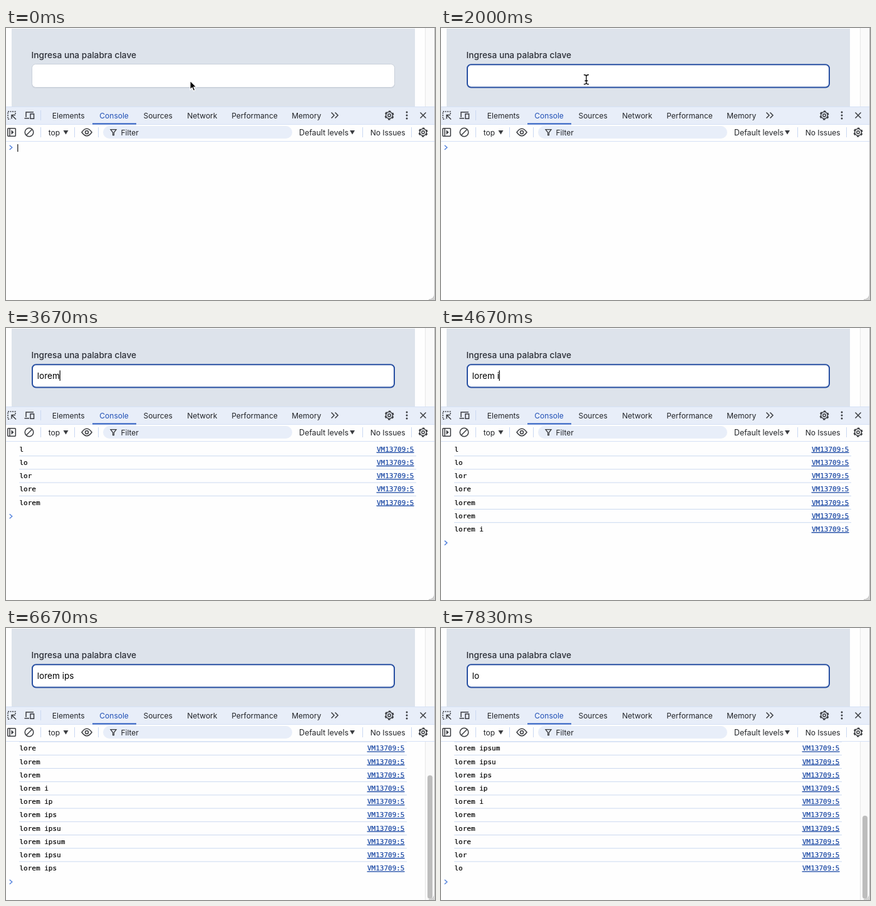
An HTML page that plays this animation: 685 by 433 pixels, repeating every 8000 ms.

```html
<!DOCTYPE html>
<html lang="es">
<head>
<meta charset="utf-8">
<style>
html, body { margin: 0; width: 100%; height: 100%; overflow: hidden; background: #d2d2d2; }
svg { display: block; }
text { font: 12px Inter, sans-serif; fill: #222428; }
.mid { text-anchor: middle; }
.log text { font: 11px "DejaVu Sans Mono", monospace; fill: #000; stroke: #000; stroke-width: .2; white-space: pre; }
.log .link { fill: #1745a3; stroke: #1745a3; text-decoration: underline; text-anchor: end; }
.icon { fill: none; stroke: #3b3d41; stroke-width: 1.5; }
.solid { fill: #3b3d41; }
.beam { fill: none; stroke-linecap: round; }
</style>
</head>
<body>
<svg width="685" height="433" viewBox="0 0 685 433">
  <defs>
    <clipPath id="win"><path d="M0 0H685V423a10 10 0 0 1-10 10H0Z"/></clipPath>
    <clipPath id="pane"><path d="M0 181H685V433H0Z"/></clipPath>
    <g id="gear" class="icon">
      <circle r="5.4"/><circle r="2.2"/>
      <circle r="6.5" stroke-width="2" stroke-dasharray="3.4" stroke-dashoffset="-1.7"/>
    </g>
    <path id="drop" class="solid" d="M-4-3H4L0 3.5Z"/>
    <path id="beamShape" d="M-3.5-7.5Q0-7.5 0-5V5Q0 7.5-3.5 7.5M3.5-7.5Q0-7.5 0-5V5Q0 7.5 3.5 7.5M-2 2H2"/>
  </defs>
  <g clip-path="url(#win)">
    <path fill="#fefefe" d="M0 0H685V433H0Z"/>
    <path fill="#dde3eb" d="M9 1H653V125H9Z"/>
    <path fill="#fafafa" d="M669 0H684V125H669Z"/>
    <path stroke="#e6e6e6" d="M669.5 0V125"/>
    <text x="40.6" y="48" style="font-size:13.7px;font-weight:500;fill:#2b2e36">Ingresa una palabra clave</text>
    <rect x="41" y="58.5" width="580" height="37.5" rx="6" fill="#c8cfd9" opacity=".6"/>
    <rect id="field" fill="#fff"/>
    <text id="value" x="49.7" y="81" style="font-size:13.6px;fill:#000;white-space:pre"></text>
    <path id="caret" stroke="#000" stroke-width="1.2"/>

    <path fill="#e8eef9" d="M0 125H684V153H0Z"/>
    <path stroke="#d5e1f6" d="M0 125.5H684M0 153.5H684M0 180.5H684"/>
    <path stroke="#c9d8f2" d="M55.5 131V147M55.5 158V174M109.5 158V174M147.5 158V174M569.5 158V174M647.5 158V174"/>
    <path fill="#2a5bc0" d="M138 151.5H208V153.5H138Z"/>
    <g id="tabs"></g>
    <rect x="155" y="156" width="302" height="20" rx="10" fill="#e8eef9"/>
    <text x="67.8" y="170.5">top</text>
    <text x="183.4" y="170.5">Filter</text>
    <text x="468" y="170.5" style="font-size:12.4px">Default levels</text>
    <text x="609.6" y="170.5" class="mid">No Issues</text>
    <use href="#drop" x="95.5" y="166"/>
    <use href="#drop" x="553" y="166"/>
    <use href="#gear" x="612" y="139"/>
    <use href="#gear" x="666" y="166"/>
    <g class="icon">
      <path stroke-dasharray="2 1.5" d="M15 137V133H3V145H7"/>
      <path d="M9 144.5V138.5H15M9.5 139L16 145.5"/>
      <path d="M32 142V134H44M29.5 143.7H37"/>
      <rect x="39" y="136.8" width="5.5" height="7.5"/>
      <rect x="2.7" y="159.7" width="12.6" height="12.6" rx="1"/>
      <path d="M6 160V172"/>
      <circle cx="37" cy="166" r="6.8"/>
      <path d="M32.3 170.7L41.7 161.3"/>
      <path d="M121 166Q129 154.5 137 166Q129 177.5 121 166Z"/>
      <circle cx="129" cy="166" r="2.5"/>
      <path stroke-width="1.3" d="M167 161.7H176L172.4 166.3V170.7H170.6V166.3Z"/>
      <path d="M519.5 134.5L524 139L519.5 143.5M525.5 134.5L530 139L525.5 143.5"/>
      <path d="M661.5 134.5L670.5 143.5M670.5 134.5L661.5 143.5"/>
    </g>
    <g class="solid">
      <path d="M8.5 162.3L12.5 166L8.5 169.7Z"/>
      <circle cx="640" cy="134" r="1.5"/>
      <circle cx="640" cy="139" r="1.5"/>
      <circle cx="640" cy="144" r="1.5"/>
    </g>

    <g id="log" class="log" clip-path="url(#pane)"></g>
    <path id="promptCaret" stroke="#111" stroke-width="1.2" d="M18.8 185V197"/>
    <path id="prompt" fill="none" stroke="#5684de" stroke-width="1.5" d="M-2.3-3.5L1.7 0L-2.3 3.5"/>
    <g id="bar">
      <path fill="#fafafa" d="M669 181H684V433H669Z"/>
      <path stroke="#e6e6e6" d="M669.5 181V433"/>
      <rect id="thumb" x="673" width="8" rx="4" fill="#bdbdbd"/>
    </g>
    <path id="arrow" stroke="#fff" stroke-width="1.2" d="M0 0V14L3.2 11L5.3 16L7.8 15L5.7 10.2H10Z"/>
    <g id="beam" class="beam">
      <use href="#beamShape" stroke="#fff" stroke-width="3"/>
      <use href="#beamShape" stroke="#000" stroke-width="1.3"/>
    </g>
  </g>
  <path fill="none" stroke="#b4b4b4" d="M684.5 0V423a9.5 9.5 0 0 1-9.5 9.5"/>
</svg>
<script>
const LOOP = 8000, PITCH = 21.2, PHRASE = 'lorem ipsum';
const $ = id => document.getElementById(id);
const show = (id, on) => $(id).style.display = on ? '' : 'none';
const attrs = (id, o) => Object.entries(o).forEach(([k, v]) => $(id).setAttribute(k, v));
const move = (id, x, y) => attrs(id, { transform: `translate(${x} ${y})` });

// time, pointer x, y
const pointer = [[0, 294, 84], [170, 284, 86], [330, 274, 88], [670, 256, 86], [830, 240, 83], [1000, 232, 82]];

// time, logged lines, caret visible
const typing = [
  [0, 0, 0], [1500, 0, 1], [2000, 0, 0], [2500, 0, 1], [2670, 1, 1], [3170, 2, 1], [3330, 4, 1],
  [3670, 5, 1], [4170, 5, 0], [4500, 6, 1], [4670, 7, 1], [5330, 8, 1], [5670, 10, 1], [6000, 11, 1],
  [6330, 11, 0], [6500, 12, 0], [6670, 13, 0], [6830, 14, 0], [7000, 15, 0],
  [7330, 17, 0], [7500, 18, 0], [7670, 19, 0], [7830, 20, 0]
];
const at = (list, t) => list.findLast(step => step[0] <= t);

// the phrase grows to full length, then is deleted again
const typed = n => PHRASE.slice(0, Math.min(n, 2 * PHRASE.length - n));

$('tabs').innerHTML = [['Elements', 99.7], ['Console', 172.6], ['Sources', 242.7], ['Network', 313.3],
  ['Performance', 397], ['Memory', 479.7]].map(([name, x]) =>
  `<text class="mid" x="${x}" y="143.5"${name == 'Console' ? ' style="fill:#1f4fb5"' : ''}>${name}</text>`).join('');

function drawLog(n) {
  const full = n > 9, right = full ? 636.5 : 651.5;
  const top = full ? 382.4 - (n - 1) * PITCH : 193;
  let rows = '';
  for (let i = Math.max(0, n - 11); i < n; i++) {
    const y = top + i * PITCH;
    if (i) rows += `<path stroke="#cbd9f0" d="M21 ${y - 10.5}H${right + 3.5}"/>`;
    rows += `<text x="21.5" y="${y + 3.8}">${typed(i + 1)}</text>` +
      `<text class="link" x="${right}" y="${y + 3.8}">VM13709:5</text>`;
  }
  $('log').innerHTML = rows;
  move('prompt', 8, n ? top + n * PITCH + .7 : 190.3);
  show('bar', full);
  if (full) {
    const h = 253 * 253 / (254 + (n - 10) * PITCH) - 5;
    attrs('thumb', { y: 431 - h, height: h });
  }
}

function draw(t) {
  const [, n, caret] = at(typing, t), [, x, y] = at(pointer, t);
  const focus = t >= 1500;
  attrs('field', focus
    ? { x: 42, y: 58.2, width: 578, height: 36.3, rx: 6, stroke: '#2850a2', 'stroke-width': 2 }
    : { x: 41.5, y: 57.5, width: 579, height: 37, rx: 6, stroke: '#c9d0da', 'stroke-width': 1 });
  $('value').textContent = typed(n);
  const end = 50 + (n ? $('value').getComputedTextLength() : 0);
  attrs('caret', { d: `M${end} 67.5V84` });
  show('caret', caret);
  show('promptCaret', t < 670 || t >= 1330 && !focus);
  show('arrow', t < 830);
  show('beam', t >= 830 && !n);
  move('arrow', x, y);
  move('beam', x, y);
  drawLog(n);
}

let last;
function tick(now) {
  const t = now % LOOP;
  const key = at(typing, t)[0] + '|' + at(pointer, t)[0] + '|' + (t >= 1330);
  if (key !== last) draw(t);
  last = key;
  requestAnimationFrame(tick);
}
draw(0);
requestAnimationFrame(tick);
</script>
</body>
</html>
```
